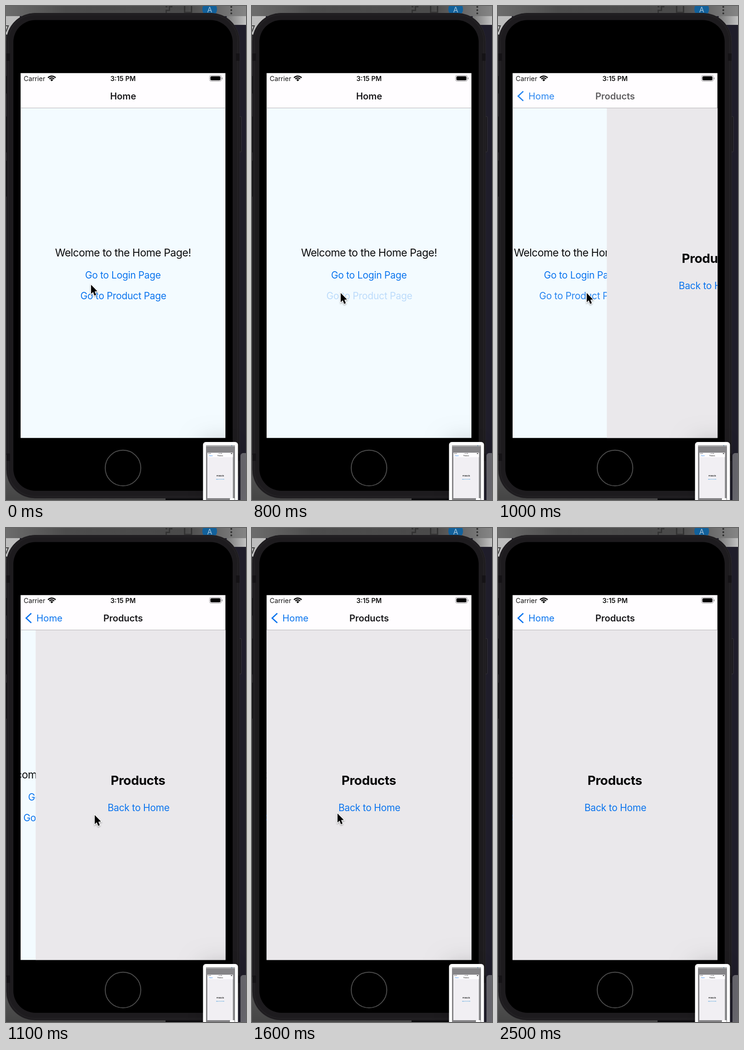
These frames come from a looping animation (522 px wide and 1073 px high, 2.7 s). An HTML page with a canvas:

```html
<!DOCTYPE html>
<html lang="en">
<head>
<meta charset="utf-8">
<title>Page navigation</title>
<style>
html, body { margin: 0; width: 100%; height: 100%; overflow: hidden; background: #1c1a1d; }
canvas { display: block; width: 522px; height: 1073px; }
</style>
</head>
<body>
<canvas id="stage" width="522" height="1073"></canvas>
<script>
const ctx = document.getElementById('stage').getContext('2d');
const LOOP = 2700, STEP = 100;
const SCREEN = { x: 31.5, y: 145.5, w: 446, h: 793 };
const BODY_TOP = 222;
const BLUE = '#0a74ee', INK = '#1c1b1e';

// Piecewise linear value over time from [time, value] pairs.
function track(keys) {
  return t => {
    if (t <= keys[0][0]) return keys[0][1];
    for (let i = 1; i < keys.length; i++) {
      const [t0, v0] = keys[i - 1], [t1, v1] = keys[i];
      if (t < t1) return v0 + (v1 - v0) * (t - t0) / (t1 - t0);
    }
    return keys[keys.length - 1][1];
  };
}

const slide = track([[800, 0], [900, .117], [1000, .54], [1100, .926], [1200, 1]]);
const linkAlpha = track([[600, 1], [700, .5], [800, .23], [900, .34], [1000, .88], [1100, 1]]);
const homeAlpha = track([[800, 1], [900, .58], [1000, 0]]);
const titleAlpha = track([[800, 0], [900, .22], [1000, .7], [1100, 1]]);
const backAlpha = track([[800, 0], [900, .44], [1000, .87], [1100, 1]]);
const cursorX = track([[0, 185], [600, 193], [1200, 193], [1600, 186]]);
const cursorY = track([[0, 605.5], [600, 623.5], [1200, 623.5], [1600, 620]]);
const CURSOR_GONE = 2200;

function rect(x, y, w, h, fill) {
  ctx.fillStyle = fill;
  ctx.fillRect(x, y, w, h);
}

function round(x, y, w, h, r, fill, stroke, line = 1) {
  ctx.beginPath();
  ctx.roundRect(x, y, w, h, r);
  if (fill) { ctx.fillStyle = fill; ctx.fill(); }
  if (stroke) { ctx.strokeStyle = stroke; ctx.lineWidth = line; ctx.stroke(); }
}

function disc(x, y, r, fill) {
  ctx.beginPath();
  ctx.arc(x, y, r, 0, 7);
  ctx.fillStyle = fill;
  ctx.fill();
}

function path(points, close) {
  ctx.beginPath();
  points.forEach(([x, y]) => ctx.lineTo(x, y));
  if (close) ctx.closePath();
}

function text(str, x, y, size, fill, { weight = 400, align = 'center', spacing = 0, alpha = 1 } = {}) {
  ctx.save();
  ctx.globalAlpha = alpha;
  ctx.font = `${weight} ${size}px Inter, sans-serif`;
  ctx.letterSpacing = spacing + 'px';
  ctx.textAlign = align;
  ctx.fillStyle = fill;
  ctx.fillText(str, x, y);
  ctx.restore();
}

function gradient(x0, y0, x1, y1, ...stops) {
  const g = ctx.createLinearGradient(x0, y0, x1, y1);
  stops.forEach(([at, color]) => g.addColorStop(at, color));
  return g;
}

function drawDesktop() {
  rect(0, 0, 522, 1073, '#1f1d2a');
  rect(0, 0, 522, 22, gradient(0, 0, 522, 0,
    [0, '#6c6c6c'], [.25, '#4d4d4d'], [.75, '#4a4a4a'], [1, '#858585']));
  rect(0, 22, 30, 40, '#bdbdbd');
  rect(480, 22, 42, 19, gradient(480, 0, 522, 0, [0, '#777777'], [1, '#c2c2c2']));
  rect(0, 62, 12, 940, '#2b2a2d');
  rect(0, 975, 347, 98, gradient(0, 975, 0, 1073, [0, '#5c5c5c'], [1, '#454545']));
  rect(347, 1060, 90, 13, '#08080a');
  ctx.strokeStyle = '#3a3a3a';
  ctx.lineWidth = 2;
  path([[0, 43], [5, 43], [0, 56]]);
  ctx.stroke();

  // Toolbar icons
  rect(347, 0, 4, 3, '#343434');
  rect(354, 0, 8, 3, '#343434');
  rect(347, 8, 9, 3, '#343434');
  rect(347, 8, 3, 7, '#343434');
  rect(354, 3, 3, 8, '#343434');
  ctx.strokeStyle = '#343434';
  ctx.lineWidth = 3;
  ctx.strokeRect(388.5, -4, 15, 18);
  disc(443, 7, 16, '#12619b');
  text('A', 443, 14, 16, '#a9c5da');
  [2, 9, 16].forEach(y => disc(490, y, 2, '#303030'));

  round(510, 971, 16, 120, 6, '#6c6b72');
}

function drawPhone() {
  round(507, 240, 5, 77, 2, '#1b191e', '#39373c');
  round(1, 15.5, 507, 1053.5, 62, '#1d1b1e', '#2b292c');
  round(5, 19, 499, 1046, 58, null, '#232124', 2);
  for (const y of [103, 972]) {
    rect(1, y, 8, 16, '#151316');
    rect(500, y, 8, 16, '#151316');
  }
  for (const [y, h] of [[152, 38], [240, 78], [336, 78]]) rect(0, y, 1.5, h, '#0d0c0e');
  round(16, 30.5, 477, 1022.5, 48, '#000');
  ctx.beginPath();
  ctx.arc(254.5, 1003.5, 38.7, 0, 7);
  ctx.strokeStyle = '#4c4c4c';
  ctx.lineWidth = 2;
  ctx.stroke();
}

function drawStatusBar() {
  text('Carrier', 38.5, 163, 14.3, '#111', { align: 'left' });
  text('3:15 PM', 254.5, 163, 14.5, '#111', { weight: 600 });
  const cx = 99.5, cy = 163, spread = .86, up = -Math.PI / 2;
  ctx.strokeStyle = '#000';
  ctx.lineWidth = 2.5;
  for (const r of [10.8, 6.8]) {
    ctx.beginPath();
    ctx.arc(cx, cy, r, up - spread, up + spread);
    ctx.stroke();
  }
  ctx.beginPath();
  ctx.moveTo(cx, cy + .5);
  ctx.arc(cx, cy, 4, up - spread, up + spread);
  ctx.fillStyle = '#000';
  ctx.fill();

  round(442.5, 150.5, 26, 13, 4, null, '#99979a');
  round(444.5, 152.5, 22, 9, 2.5, '#000');
  round(469.5, 155, 1.5, 4.5, 1, '#99979a');
}

function drawNavBar(t) {
  rect(SCREEN.x, SCREEN.y, SCREEN.w, BODY_TOP - SCREEN.y, '#fffdff');
  rect(SCREEN.x, BODY_TOP - 1, SCREEN.w, 1, '#b5b3b6');
  drawStatusBar();
  const title = alpha => ({ weight: 600, spacing: -.1, alpha });
  text('Home', 254.7, 203, 20, INK, title(homeAlpha(t)));
  text('Products', 254.7, 203, 20, INK, title(titleAlpha(t)));
  const alpha = backAlpha(t);
  text('Home', 66.3, 203, 20.2, BLUE, { align: 'left', alpha });
  ctx.save();
  ctx.globalAlpha = alpha;
  ctx.strokeStyle = BLUE;
  ctx.lineWidth = 2.7;
  path([[55, 185.3], [43.8, 195.7], [55, 206]]);
  ctx.stroke();
  ctx.restore();
}

function drawPages(t) {
  const p = slide(t);
  const bodyHeight = SCREEN.y + SCREEN.h - BODY_TOP;
  const homeX = -.3 * SCREEN.w * p, nextX = SCREEN.w * (1 - p);
  const link = { spacing: -.25 };

  rect(SCREEN.x, BODY_TOP, SCREEN.w, bodyHeight, '#f3fbff');
  text('Welcome to the Home Page!', 254.5 + homeX, 544, 23, '#0b0b0c', { spacing: -.52 });
  text('Go to Login Page', 254.3 + homeX, 592, 20.8, BLUE, link);
  text('Go to Product Page', 255.2 + homeX, 636.7, 20.8, BLUE, { ...link, alpha: linkAlpha(t) });

  if (p === 0) return;
  rect(SCREEN.x + nextX, BODY_TOP, SCREEN.w, bodyHeight, '#eae8eb');
  text('Products', 254 + nextX, 558, 27.7, '#060607', { weight: 700, spacing: -.4 });
  text('Back to Home', 255.2 + nextX, 615.3, 20.8, BLUE, link);
}

function drawThumbnail() {
  ctx.save();
  ctx.shadowColor = 'rgba(0,0,0,.22)';
  ctx.shadowBlur = 50;
  round(428.5, 947, 76, 140, 6, '#fff');
  ctx.restore();
  rect(435, 954, 63, 119, '#858487');
  rect(435, 954, 63, 3, '#a9a9aa');
  rect(490, 954, 2, 2, '#5c7f99');
  rect(438, 970.5, 55.5, 98.5, '#f1eff3');
  rect(438, 970.5, 55.5, 9.5, '#fdfcfe');
  text('Carrier', 439, 973, 2.2, '#333', { align: 'left' });
  text('3:15 PM', 466, 973, 2.2, '#333');
  rect(489, 971.5, 3, 1.5, '#333');
  text('‹ Home', 440, 978, 2.8, BLUE, { align: 'left' });
  text('Products', 466, 978, 2.8, '#222', { weight: 600 });
  text('Products', 466, 1021.7, 3.7, '#222', { weight: 700 });
  text('Back to Home', 466, 1028.5, 2.7, '#2f92d8');
  round(487, 1069, 10, 8, 1, '#fff');
}

function drawCursor(x, y) {
  ctx.save();
  ctx.translate(x, y);
  path([[0, 0], [0, 19.8], [4.5, 15.7], [7.4, 23.6], [11, 22.1], [7.9, 14.4], [13.6, 14.1]], true);
  ctx.shadowColor = 'rgba(0,0,0,.35)';
  ctx.shadowBlur = 3;
  ctx.shadowOffsetY = 1.5;
  ctx.strokeStyle = '#fff';
  ctx.lineWidth = 2.6;
  ctx.stroke();
  ctx.shadowColor = 'transparent';
  ctx.fillStyle = '#000';
  ctx.fill();
  ctx.restore();
}

function draw(t) {
  drawDesktop();
  drawPhone();
  ctx.save();
  ctx.beginPath();
  ctx.rect(SCREEN.x, SCREEN.y, SCREEN.w, SCREEN.h);
  ctx.clip();
  drawPages(t);
  drawNavBar(t);
  ctx.restore();
  drawThumbnail();
  if (t < CURSOR_GONE) drawCursor(cursorX(t), cursorY(t));
}

const start = performance.now();
function tick() {
  const t = Math.max(0, performance.now() - start) % LOOP;
  draw(Math.floor(t / STEP) * STEP);
  requestAnimationFrame(tick);
}
tick();
</script>
</body>
</html>
```
